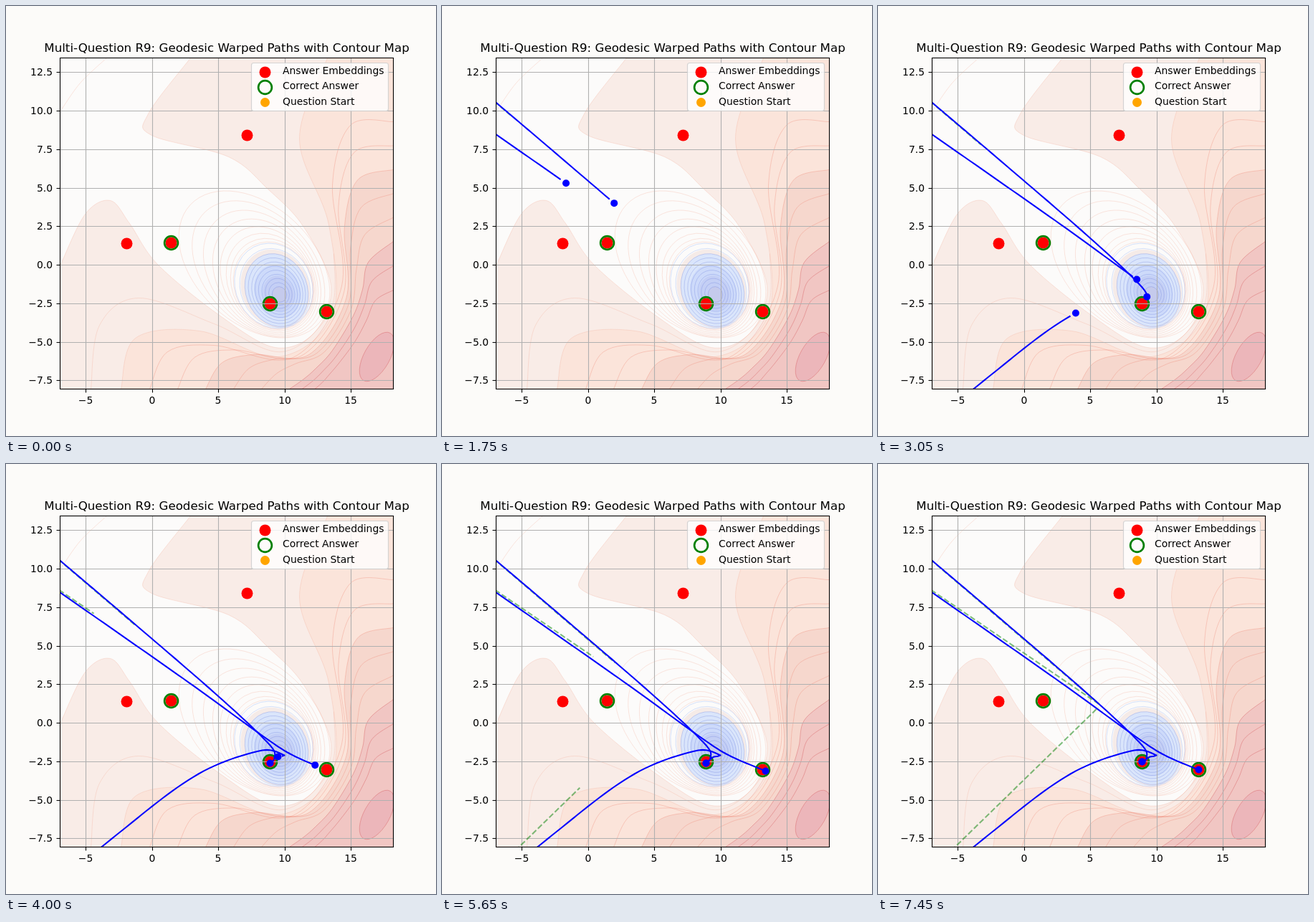
These frames come from a looping animation (600x600 px, 7500 ms). An HTML page with a canvas:

```html
<!DOCTYPE html>
<html lang="en">
<head>
<meta charset="utf-8">
<title>Geodesic Warped Paths</title>
<style>
  html, body { margin: 0; width: 100%; height: 100%; overflow: hidden; background: #fcfbf9; }
  canvas { display: block; }
</style>
</head>
<body>
<canvas id="stage" width="600" height="600"></canvas>
<script>
const ctx = document.getElementById('stage').getContext('2d');
const STEP = 50, FRAMES = 150, LAST = FRAMES - 1;
const L = 75, T = 72, R = 540, B = 534;
const px = x => Math.round(203.6 + 18.5 * x);
const py = y => Math.round(361 - 21.5 * y);
const mix = (a, b, k) => Array.isArray(a) ? a.map((v, i) => mix(v, b[i], k)) : a + (b - a) * k;
const range = (n, fn) => Array.from({ length: n }, (_, i) => fn(i));

// Terrain: open curves by key points, rings as x, y, radii, tilt.
const valley = [[75,362], [110,290], [145,271], [172,303], [212,361], [300,433], [375,476],
  [430,455], [453,390], [415,308], [365,255], [310,210], [203,180], [198,150], [257,72]];
const skirt = [[457,345], [452,425], [385,482], [290,443], [185,407], [130,445], [118,534]];
const foot = [[448,72], [409,185], [450,305], [455,430], [380,489], [270,453], [180,463], [160,534]];
const low = [[540,161], [480,166], [455,250], [468,390], [400,490], [290,473], [225,482], [200,534]];
const mid = [[540,328], [505,357], [497,395], [484,432], [455,480], [432,505], [415,520], [395,534]];
const high = [[540,430], [520,437], [505,460], [488,485], [470,505], [460,518], [454,527], [448,534]];
const peak = [517, 489, 38, 18, -1.06];
const basin = [346, 360, 122, 82, 0.75];
const rim = [373, 390, 61, 53, 1.1];
const pool = [377, 396, 52, 43, 1.2];
const core = [381, 402, 11, 10, 1.2];

const answers = [[336,180], [168,331], [230,330], [368,415], [447,426]];
const centre = [310, 336];

// Blue tracks pass through [frame, x, y] and snap to their answer at the end.
const tracks = [
  { goal: 3, keys: [[0,31,97], [25,177,221], [45,303,330], [56,368,392], [64,374,409], [80,368,417]] },
  { goal: 4, keys: [[0,-90,64], [45,247,299], [60,355,377], [70,396,404], [86,451,428]] },
  { goal: 3, keys: [[0,-166,800], [22,-7,652], [45,160,512], [60,268,432], [72,357,399],
    [78,388,406], [80,379,408], [100,368,417]] }
];

function hermite(keys, f) {
  const end = keys.length - 1;
  if (f >= keys[end][0]) return keys[end].slice(1);
  const i = keys.findIndex(k => k[0] > f) - 1;
  const a = keys[i], b = keys[i + 1], span = b[0] - a[0], s = (f - a[0]) / span;
  const tangent = (j, c) => {
    const p = keys[Math.max(0, j - 1)], q = keys[Math.min(end, j + 1)];
    return (q[c] - p[c]) / (q[0] - p[0]) * span;
  };
  return [1, 2].map(c => mix(a[c], b[c], s * s * (3 - 2 * s))
    + tangent(i, c) * s * (1 - s) ** 2 - tangent(i + 1, c) * s * s * (1 - s));
}
for (const t of tracks) {
  t.pts = range(FRAMES, f => f === LAST ? answers[t.goal] : hermite(t.keys, f));
}

function curve(c) {
  const at = i => c[Math.min(c.length - 1, Math.max(0, i))];
  ctx.beginPath();
  ctx.moveTo(...c[0]);
  for (let i = 0; i < c.length - 1; i++) {
    const [p, q, r, s] = [at(i - 1), at(i), at(i + 1), at(i + 2)];
    ctx.bezierCurveTo(q[0] + (r[0] - p[0]) / 6, q[1] + (r[1] - p[1]) / 6,
      r[0] - (s[0] - q[0]) / 6, r[1] - (s[1] - q[1]) / 6, ...r);
  }
}
function ring(e) {
  ctx.beginPath();
  ctx.ellipse(...e, 0, 2 * Math.PI);
}
const trace = shape => Array.isArray(shape[0]) ? curve(shape) : ring(shape);

function fill(color) {
  ctx.fillStyle = color;
  ctx.fill();
}
function stroke(color, width = 1.1) {
  ctx.strokeStyle = color;
  ctx.lineWidth = width;
  ctx.stroke();
}
function area(shape, color, ...corners) {
  trace(shape);
  corners.forEach(p => ctx.lineTo(...p));
  fill(color);
}
function contour(shape, color) {
  trace(shape);
  stroke(color, 0.7);
}
function polyline(pts, color, width) {
  ctx.beginPath();
  pts.forEach(p => ctx.lineTo(...p));
  stroke(color, width);
}
function disc(x, y, r, color) {
  ring([x, y, r, r, 0]);
  fill(color);
}
function hoop(x, y) {
  ring([x, y, 9.4, 9.4, 0]);
  stroke('#008000', 2.7);
}
function label(s, x, y, align = 'left', size = 13.89) {
  ctx.font = `${size}px "DejaVu Sans", sans-serif`;
  ctx.textAlign = align;
  ctx.fillStyle = '#000';
  ctx.fillText(s, x - 0.5, y - 0.5);
}

const xTicks = range(5, i => 5 * i - 5);
const yTicks = range(9, i => 2.5 * i - 7.5);

function drawFills() {
  ctx.fillStyle = '#f9ece7';
  ctx.fillRect(L, T, R - L, B - T);
  area(valley, '#fcfbfa', [L, T]);
  area(foot, '#fbe4da', [R, B], [R, T]);
  area(mix(low, mid, 0.4), '#f6d7cd', [R, B]);
  area(mid, '#f1c6c3', [R, B]);
  area(peak, '#ecb6ba');
  area(mix(rim, pool, 0.6), '#f5ebe8');
  ['#dae5fb', '#cddafa', '#c4cff5', '#c5caec'].forEach((c, i) => area(mix(pool, core, i / 3), c));
}
function drawContours() {
  const pale = 'rgba(240,165,145,.4)', coral = 'rgba(236,125,105,.45)', red = 'rgba(205,70,75,.5)';
  const sky = 'rgba(140,175,245,.5)', blue = 'rgba(95,115,215,.4)';
  contour([[75,147], [103,107], [140,72]], pale);
  for (const c of [valley, skirt, foot]) contour(c, pale);
  for (let i = 0; i < 5; i++) contour(mix(low, mid, i / 5), coral);
  for (let i = 0; i < 3; i++) contour(mix(mid, high, i / 3), red);
  contour(peak, red);
  for (let i = 0; i < 8; i++) contour(mix(basin, rim, 1 - (1 - i / 8) ** 1.8), pale);
  for (let i = 0; i < 2; i++) contour(mix(rim, pool, i / 2), sky);
  for (let i = 0; i <= 8; i++) contour(mix(pool, core, i / 8), blue);
}
function drawGrid() {
  for (const x of xTicks) polyline([[px(x), T], [px(x), B]], '#b0b0b0');
  for (const y of yTicks) polyline([[L, py(y)], [R, py(y)]], '#b0b0b0');
}
function drawTracks(f) {
  // Lines trail their dots by one step.
  const u = Math.max(0, f - 1) / LAST;
  ctx.setLineDash([7.7, 3.3]);
  for (const { pts } of tracks) polyline([pts[0], mix(pts[0], centre, u)], 'rgba(0,128,0,.5)', 2.08);
  ctx.setLineDash([]);
  ctx.lineJoin = 'round';
  for (const { pts } of tracks) polyline(pts.slice(0, f), '#00f', 2.08);
  for (const { pts } of tracks) disc(...pts[f], 5, '#00f');
}
function drawAxes() {
  ctx.strokeStyle = '#000';
  ctx.lineWidth = 1.1;
  ctx.lineJoin = 'miter';
  ctx.strokeRect(L, T, R - L, B - T);
  const name = v => String(v).replace('-', '\u2212');
  for (const x of xTicks) {
    polyline([[px(x), B], [px(x), B + 5]], '#000');
    label(name(x), px(x), 555, 'center');
  }
  for (const y of yTicks) {
    polyline([[L - 5, py(y)], [L, py(y)]], '#000');
    label(name(y.toFixed(1)), 65, py(y) + 5, 'right');
  }
  label('Multi-Question R9: Geodesic Warped Paths with Contour Map', 308, 64, 'center', 16.67);
}
function drawLegend() {
  ctx.beginPath();
  ctx.roundRect(342, 79, 191, 67, 3);
  fill('rgba(255,255,255,.8)');
  stroke('rgba(204,204,204,.8)', 1.2);
  disc(361, 92, 8, '#f00');
  hoop(361, 113);
  disc(361, 134, 6.5, '#ffa500');
  label('Answer Embeddings', 386, 95);
  label('Correct Answer', 386, 116);
  label('Question Start', 386, 138);
}

function draw(f) {
  ctx.fillStyle = '#fcfbf9';
  ctx.fillRect(0, 0, 600, 600);
  ctx.save();
  ctx.translate(0.5, 0.5); // pixel centres
  ctx.save();
  ctx.beginPath();
  ctx.rect(L, T, R - L, B - T);
  ctx.clip();
  drawFills();
  drawContours();
  answers.forEach(p => disc(...p, 8, '#f00'));
  answers.slice(2).forEach((p, i) => hoop(...(i ? p : answers[2])));
  drawGrid();
  drawTracks(f);
  ctx.restore();
  drawAxes();
  drawLegend();
  ctx.restore();
}

let shown = -1;
function tick() {
  const f = Math.floor(performance.now() / STEP) % FRAMES;
  if (f !== shown) draw(shown = f);
  requestAnimationFrame(tick);
}
tick();
</script>
</body>
</html>
```
